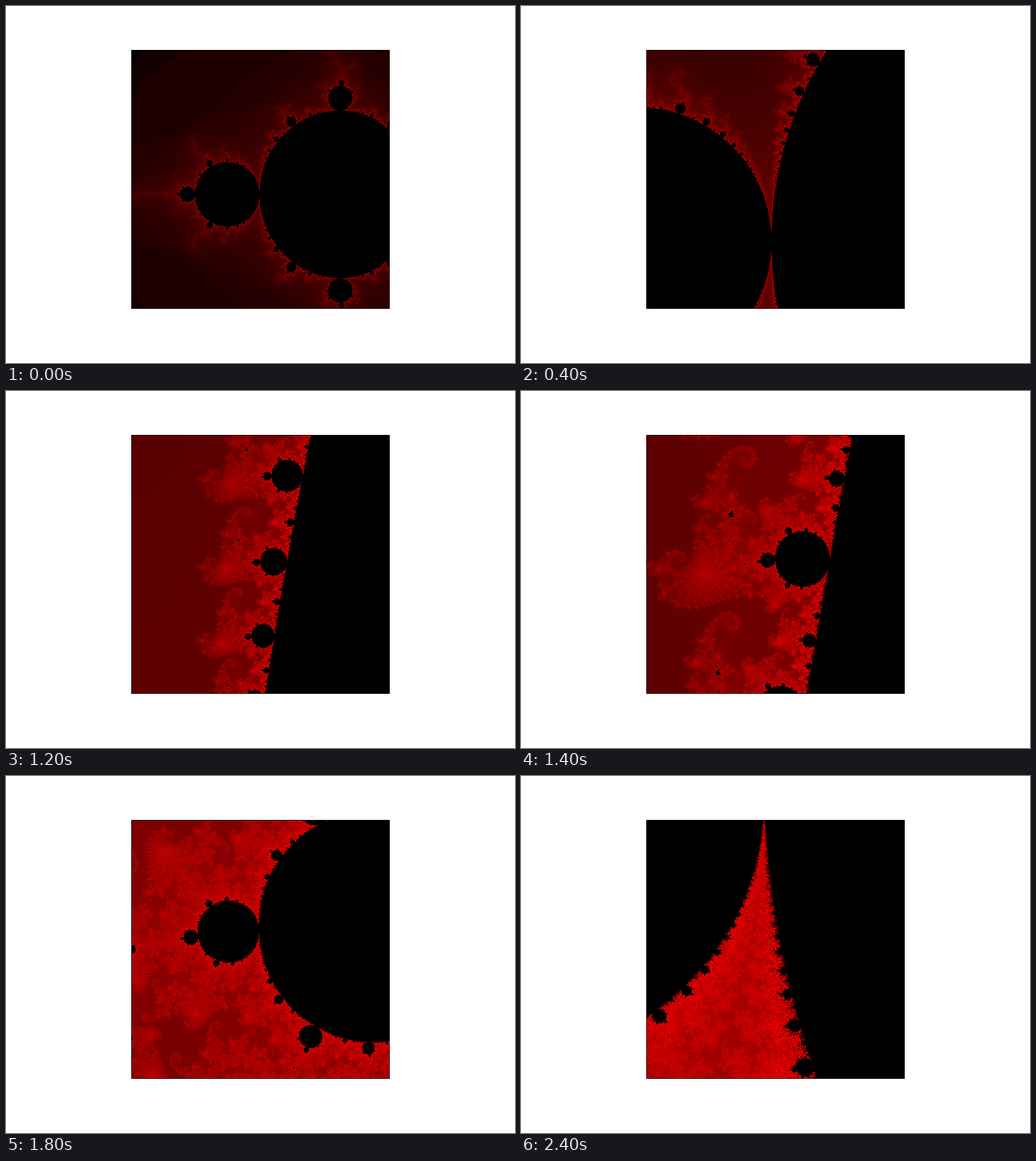
An HTML page with a canvas for the animation above (2.5 s loop, 894 by 626 pixels).

```html
<!DOCTYPE html>
<html lang="en">
<head>
<meta charset="utf-8">
<title>Mandelbrot zoom</title>
<style>
  html, body { margin: 0; width: 100%; height: 100%; overflow: hidden; background: #fff; }
  canvas { display: block; }
</style>
</head>
<body>
<canvas id="stage" width="894" height="626"></canvas>
<script>
const SIZE = 454, LEFT = 220, TOP = 77;
const STEPS = 25, STEP_MS = 100, SHRINK = 0.7;
const BASE_SCALE = 226.5;              // pixels per unit in the first view
const LIMIT = 10000;

// Complex helpers on [re, im] pairs
const add = ([a, b], [c, d]) => [a + c, b + d];
const sub = ([a, b], [c, d]) => [a - c, b - d];
const mul = ([a, b], [c, d]) => [a * c - b * d, a * d + b * c];
const div = ([a, b], [c, d]) => {
  const m = c * c + d * d;
  return [(a * c + b * d) / m, (b * c - a * d) / m];
};

// 27 iterations from z: the end point and the derivative along the way
function cycle(z, c) {
  let slope = [1, 0];
  for (let i = 0; i < 27; i++) {
    slope = mul(slope, [2 * z[0], 2 * z[1]]);
    z = add(mul(z, z), c);
  }
  return [z, slope];
}

// Where the period-27 bulb touches its largest satellite (multiplier -1)
function findJunction() {
  let c = [-0.7413064, 0.1159414], z = [0, 0];
  for (let k = 0; k < 120; k++) {
    for (let i = 0; i < 4; i++) {
      const [end, slope] = cycle(z, c);
      z = sub(z, div(sub(end, z), sub(slope, [1, 0])));
    }
    c = add(c, mul([4.3e-4, 2e-5], sub([-1, 0], cycle(z, c)[1])));
  }
  return c;
}

// Escape count, or 0 for points inside the set
function escape(a, b) {
  const u = a - 0.25, b2 = b * b, q = u * u + b2;
  if (q * (q + u) <= b2 / 4 || (a + 1) * (a + 1) + b2 <= 1 / 16) return 0;
  let x = 0, y = 0, oldX = 0, oldY = 0, mark = 32;
  for (let n = 1; n < LIMIT; n++) {
    const t = x * x - y * y + a;
    y = 2 * x * y + b;
    x = t;
    if (x * x + y * y > 4) return n;
    if (Math.abs(x - oldX) < 1e-11 && Math.abs(y - oldY) < 1e-11) return 0;
    if (n === mark) { oldX = x; oldY = y; mark *= 2; }
  }
  return 0;
}

function render(center, scale) {
  const counts = new Int16Array(SIZE * SIZE).fill(-1);
  const half = (SIZE - 1) / 2;

  function at(x, y) {
    const i = y * SIZE + x;
    if (counts[i] < 0)
      counts[i] = escape(center[0] + (x - half) / scale, center[1] - (y - half) / scale);
    return counts[i];
  }

  function borderInside(x0, y0, x1, y1) {
    for (let x = x0; x <= x1; x++) if (at(x, y0) || at(x, y1)) return false;
    for (let y = y0; y <= y1; y++) if (at(x0, y) || at(x1, y)) return false;
    return true;
  }

  // The set has no holes, so a border inside it encloses only inside points
  function fill(x0, y0, x1, y1) {
    if (borderInside(x0, y0, x1, y1)) {
      for (let y = y0; y <= y1; y++) counts.fill(0, y * SIZE + x0, y * SIZE + x1 + 1);
    } else if (x1 - x0 < 6) {
      for (let y = y0; y <= y1; y++) for (let x = x0; x <= x1; x++) at(x, y);
    } else {
      const mx = (x0 + x1) >> 1, my = (y0 + y1) >> 1;
      fill(x0, y0, mx, my);
      fill(mx, y0, x1, my);
      fill(x0, my, mx, y1);
      fill(mx, my, x1, y1);
    }
  }
  fill(0, 0, SIZE - 1, SIZE - 1);

  const image = new ImageData(SIZE, SIZE);
  counts.forEach((n, i) => {
    image.data[4 * i] = n ? 255 * Math.log(n) / Math.log(LIMIT) : 0;
    image.data[4 * i + 3] = 255;
  });
  return image;
}

const ctx = document.getElementById("stage").getContext("2d");
const scaleAt = step => BASE_SCALE / SHRINK ** step;
const lastScale = scaleAt(STEPS - 1);
const center = add(findJunction(), [20.7 / lastScale, -281.4 / lastScale]);
const views = Array.from({ length: STEPS }, (_, step) => render(center, scaleAt(step)));

const start = performance.now();
function draw() {
  const time = Math.max(0, performance.now() - start);
  ctx.fillStyle = "#fff";
  ctx.fillRect(0, 0, 894, 626);
  ctx.putImageData(views[Math.floor(time / STEP_MS) % STEPS], LEFT, TOP);
  ctx.strokeRect(LEFT + 0.5, TOP + 0.5, SIZE - 1, SIZE - 1);
  requestAnimationFrame(draw);
}
draw();
</script>
</body>
</html>
```
